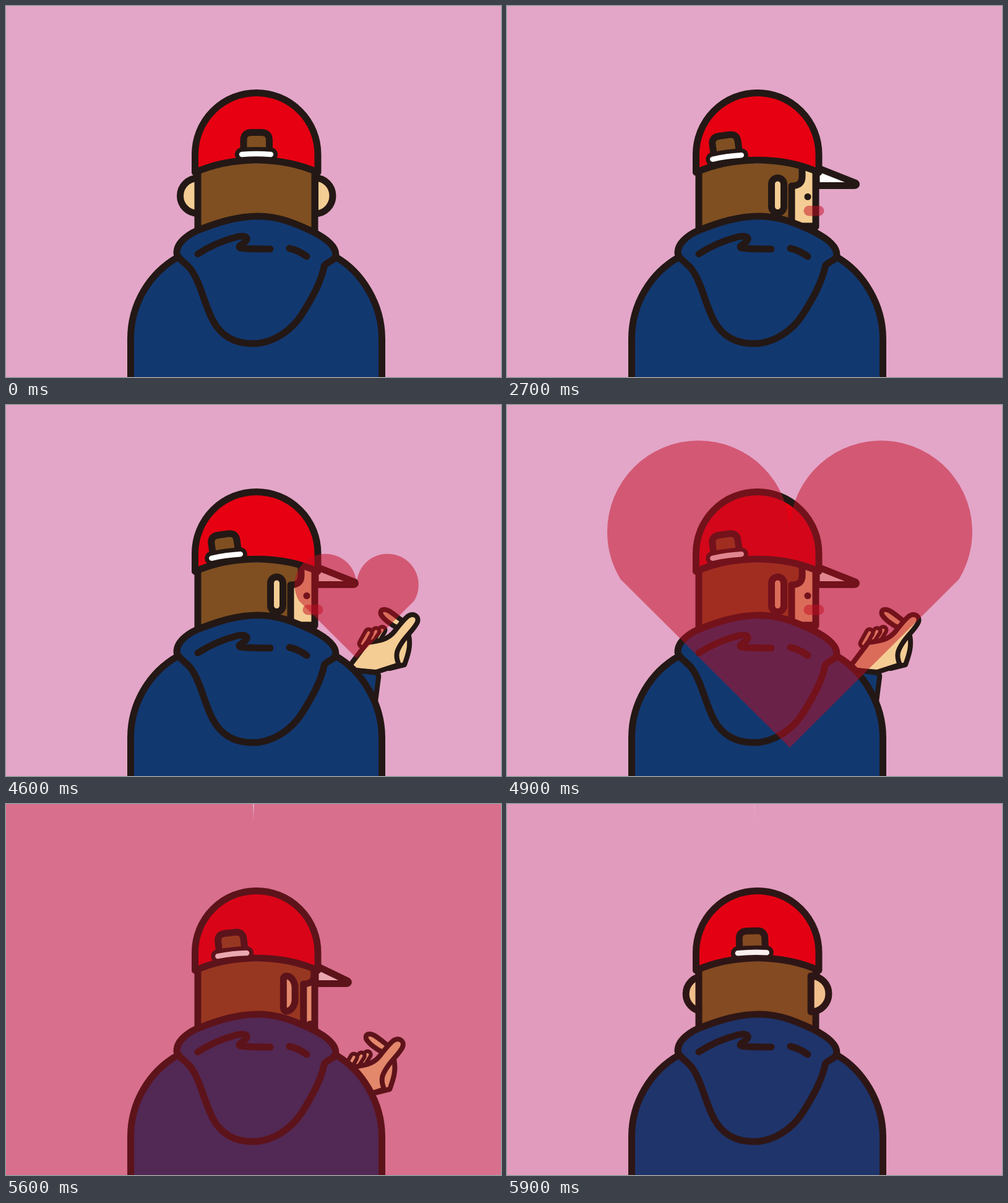
Recreate the animation shown at these times as an HTML page with a canvas. Size 800 by 600 pixels, loop 6 s.

```html
<!DOCTYPE html>
<html lang="en">
<head>
<meta charset="utf-8">
<title>Finger heart</title>
<style>
  html, body { margin: 0; width: 100%; height: 100%; overflow: hidden; background: #e3a6c8; }
  canvas { display: block; width: 800px; height: 600px; }
</style>
</head>
<body>
<canvas id="stage" width="800" height="600"></canvas>
<script>
const ctx = document.getElementById('stage').getContext('2d');
const INK = '#231815', PINK = '#e3a6c8', RED = '#e60012', NAVY = '#123870',
      BROWN = '#7f4f21', SKIN = '#f4cd94', ROSE = '#c30d23';

const lerp = (a, b, p) => a + (b - a) * p;
const clamp = v => Math.max(0, Math.min(1, v));

// Piecewise linear value of ys at x.
function track(x, xs, ys) {
  let i = 1;
  while (i < xs.length - 1 && x > xs[i]) i++;
  return lerp(ys[i - 1], ys[i], clamp((x - xs[i - 1]) / (xs[i] - xs[i - 1])));
}

function draw(d, fill, stroke = INK, width = 11) {
  const path = new Path2D(d);
  if (fill) { ctx.fillStyle = fill; ctx.fill(path); }
  if (stroke) { ctx.strokeStyle = stroke; ctx.lineWidth = width; ctx.stroke(path); }
}

function at(x, y, paint) {
  ctx.save();
  ctx.translate(x, y);
  paint();
  ctx.restore();
}

function arm(p) {
  at(lerp(-95, 0, p), lerp(165, 0, p), () => {
    const part = (d, fill) => draw(d, fill, INK, 8);
    part('M634 361C621 355 610 346 606 339C603 330 612 329 619 333C627 338 634 344 642 350', SKIN);
    for (const d of ['M598 380L608 364', 'M587 383L598 366', 'M576 386L586 368']) {
      draw(d, null, INK, 17);
      draw(d, null, SKIN, 4.5);
    }
    part('M636 380L651 373C655 392 648 408 644 420L620 426Z', SKIN);
    part('M556 421L584 384C602 382 617 380 628 366C635 357 643 347 649 342C659 335 668 342 665 351' +
         'C661 361 648 372 640 384C632 396 628 404 635 420L598 432L565 429Z', SKIN);
    part('M520 424L565 429L598 433Q603 435 602 441L597 480L588 600H500Z', NAVY);
  });
}

function sideEar(q) {
  const u = clamp((q - .58) / .42);
  const left = track(q, [0, .16, .58, 1], [499.5, 491.5, 469.5, 427.5]);
  const right = track(q, [0, .16, .58, 1], [528, 520.5, 487, 447.5]);
  const a = 10 * u, rx = lerp(right - left, 10, u), ry = lerp(29, 10, u);
  const top = 278, low = lerp(336, 334.5, u);
  draw(`M${left + a} ${top}H${right - rx}A${rx} ${ry} 0 0 1 ${right} ${top + ry}V${low - ry}` +
       `A${rx} ${ry} 0 0 1 ${right - rx} ${low}H${left + a}A${a} ${a} 0 0 1 ${left} ${low - a}` +
       `V${top + a}A${a} ${a} 0 0 1 ${left + a} ${top}Z`, SKIN);
}

function face(q) {
  ctx.save();
  ctx.beginPath();
  ctx.rect(310, 240, 189, 125);
  ctx.clip();
  ctx.translate((1 - q) * 100, 0);
  const edge = 'M477 255V276Q477 291 460 291V356';
  draw(edge + 'H510V255Z', SKIN, null);
  draw(edge, null);
  draw('M470 356H510', null);
  draw('M486 308.5h.01', null);
  ctx.restore();
}

function head(q) {
  if (q > .16) {
    const tip = track(q, [.16, .58, 1], [495, 542.5, 565]);
    draw(`M500 261L${tip - 2} 286Q${tip + 2} 290 ${tip - 5} 290.5H500Z`, '#fff');
  }
  if (q < .7) at(46 * q, 0, () => draw('M310 278.5A28.5 28.5 0 0 0 310 335.5', SKIN));
  if (!q) sideEar(q);

  draw('M310 255H499V375H310Z', BROWN, null);
  if (q > .58) face(q);
  draw('M310 262V375M499 262V' + (q > .9 ? 357 : 375), null);
  if (q) sideEar(q);

  draw('M305.5 269V240A99.25 99.5 0 0 1 504 240V269C445 242.5 365 242.5 305.5 269Z', RED);
  at(404.5 - 49 * q, 240 + 4.5 * q, () => {
    ctx.rotate(-8 * q * Math.PI / 180);
    draw('M-20.5-4V-23Q-20.5-35.5-8-35.5H8.5Q21-35.5 21-23V-4', BROWN);
    const strap = 'M-23.5 0Q0-2 23.5 0';
    draw(strap, null, INK, 22);
    draw(strap, null, '#fff', 8.5);
  });
}

function hoodie() {
  draw('M201.5 620V538C201.5 482 232 432 278 406H533C575 430 607.5 482 607.5 538V620Z', NAVY);
  draw('M276 399C276 380 300 366 316 360.5C346 349 375 340 408 340C441 340 468 352 494 364' +
       'C512 373 533 386 533 402C533 412 519 413 514.5 420C509 447 495 472 478 499' +
       'C462 524 432 546 399 546C368 546 347 533 334 508C320 481 314 446 298 425' +
       'C289 414 276 408 276 399Z', NAVY);
  draw('M310 401C330 388 352 379 371 374C382 371 391 372 389 378C387 384 373 388 378 391' +
       'C382 393 410 393 427 393M458 392Q472 395 486 405', null);
}

function heart(t) {
  const step = (t - 4300) / 100;
  const k = track(step, [0, 1, 2, 3, 4, 5, 6, 7, 8, 9, 10],
                  [0, .06, .18, .34, .54, .76, 1, 1.28, 1.72, 2.27, 2.9]);
  at(Math.max(400, 623 - 166 * k), k < 1 ? 335 - 30 * k : 296 + 9 * k, () => {
    ctx.scale(k, k);
    ctx.globalAlpha = t < 5600 ? .5 : .5 * (5967 - t) / 512;
    ctx.fillStyle = ROSE;
    ctx.beginPath();
    ctx.arc(-147.5, -100, 147.5, 0, 2.595, true);
    ctx.lineTo(0, 249);
    ctx.arc(147.5, -100, 147.5, Math.PI - 2.595, Math.PI, true);
    ctx.fill();
  });
}

function frame(now) {
  const t = Math.floor(now % 6000 / 100) * 100;   // ten pictures a second
  const back = t >= 5600;
  const turn = t < 1000 ? 0 : back ? clamp(1 - (t - 5500) / 480) : clamp((t - 900) / 700);
  const rise = back ? 1 - (t - 5500) / 200 : clamp((t - 3300) / 600);

  ctx.lineCap = ctx.lineJoin = 'round';
  ctx.fillStyle = PINK;
  ctx.fillRect(0, 0, 800, 600);
  if (t >= 3400 && rise > 0) arm(1 - (1 - rise) ** 2);
  head(turn);
  hoodie();
  if (t >= 2700 && !back) {
    ctx.globalAlpha = .5;
    draw('M487.75 331.25H504.25', null, ROSE, 16.5);
    ctx.globalAlpha = 1;
  }
  if (t >= 4400) heart(t);
  requestAnimationFrame(frame);
}
requestAnimationFrame(frame);
</script>
</body>
</html>
```
